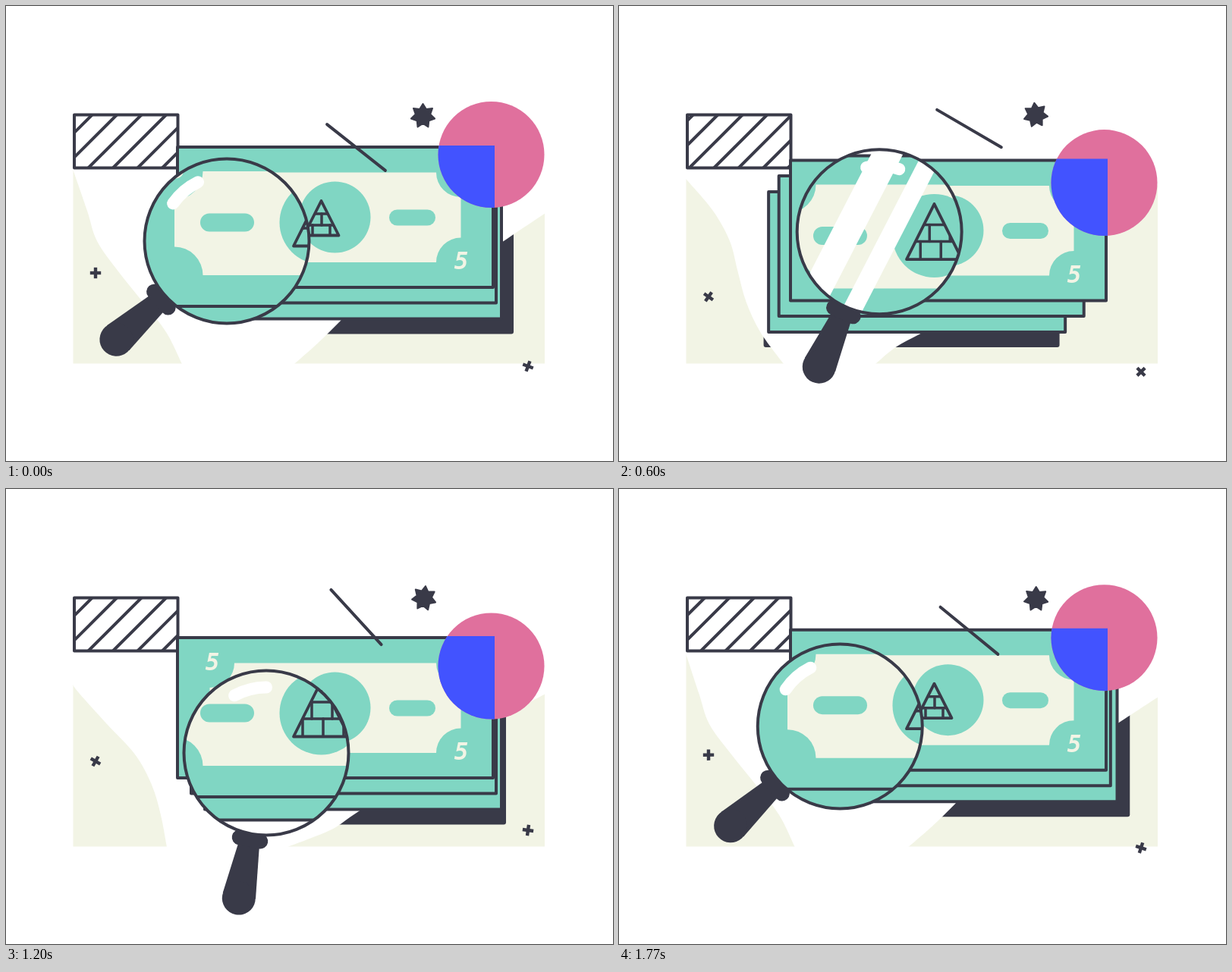
An HTML page with a canvas that plays this animation: 800 by 600 pixels, repeating every 1800 ms.

```html
<!DOCTYPE html>
<html lang="en">
<head>
<meta charset="utf-8">
<title>Banknotes under a magnifier</title>
<style>
  html, body { margin: 0; width: 100%; height: 100%; overflow: hidden; background: #fff; }
  canvas { display: block; }
</style>
</head>
<body>
<canvas id="stage" width="800" height="600"></canvas>
<script>
const c = document.getElementById('stage').getContext('2d');
const DARK = '#393a48', TEAL = '#80d6c3', CREAM = '#f2f4e5', PINK = '#e0709d', BLUE = '#4253ff', WHITE = '#fff';
const LOOP = 1800, STEP = 30, TAU = Math.PI * 2, RAD = Math.PI / 180;
const TIMES = [0, 240, 480, 750, 1200, 1530];
let now = 0;

// Smooth periodic curve through one value per entry of TIMES.
function key(...v) {
  const n = TIMES.length;
  const time = i => TIMES[(i + n) % n] + LOOP * Math.floor(i / n);
  const val = i => v[(i + n) % n];
  const slope = i => (val(i + 1) - val(i)) / (time(i + 1) - time(i));
  const tangent = i => {
    const a = time(i) - time(i - 1), b = time(i + 1) - time(i);
    return (slope(i - 1) * b + slope(i) * a) / (a + b);
  };
  let i = n - 1;
  while (TIMES[i] > now) i--;
  const h = time(i + 1) - time(i), u = (now - time(i)) / h, w = 1 - u;
  return w * w * (1 + 2 * u) * val(i) + u * w * w * h * tangent(i)
    + u * u * (3 - 2 * u) * val(i + 1) - u * u * w * h * tangent(i + 1);
}

function fill(color) { c.fillStyle = color; c.fill(); }
function stroke(width = 4, color = DARK) { c.lineWidth = width; c.strokeStyle = color; c.stroke(); }

function line(x1, y1, x2, y2, width, color) {
  c.beginPath();
  c.moveTo(x1, y1);
  c.lineTo(x2, y2);
  stroke(width, color);
}

function disc(x, y, r, color) {
  c.beginPath();
  c.arc(x, y, r, 0, TAU);
  if (color) fill(color);
}

function box(x, y, w, h, color, r = 0) {
  c.beginPath();
  c.roundRect(x, y, w, h, r);
  fill(color);
}

function placed(x, y, degrees, draw) {
  c.save();
  c.translate(x, y);
  c.rotate(degrees * RAD);
  draw();
  c.restore();
}

// Continues the path smoothly through the points.
function curve(p) {
  c.lineTo(...p[0]);
  for (let i = 0; i < p.length - 1; i++) {
    const a = p[i - 1] || p[i], b = p[i], d = p[i + 1], e = p[i + 2] || d;
    c.bezierCurveTo(b[0] + (d[0] - a[0]) / 6, b[1] + (d[1] - a[1]) / 6,
      d[0] - (e[0] - b[0]) / 6, d[1] - (e[1] - b[1]) / 6, d[0], d[1]);
  }
}

function backdrop(y) {
  box(88.5, 200, 621.5, 271.5, CREAM);
  const right = key(669, 625, 587, 583.5, 659, 695);
  box(right - 390, y + 50, 390, 196.5, DARK, 3);

  const x433 = key(423, 404, 394, 403, 453, 441), x415 = key(441, 422, 422, 445, 480, 460);
  const y650 = key(314, 312, 301, 280, 303, 312), y710 = key(273, 259, 240, 235, 270, 278);
  c.beginPath();
  c.moveTo(86, 100);
  curve([
    [88, key(215, 215, 222, 236, 258, 243)],
    [key(107, 121, 125, 120, 97, 96), 270],
    [key(120, 131, 143, 147, 133, 115), 310],
    [key(148, 147, 151, 164, 170, 150), 350],
    [key(180, 177, 166, 173, 192, 182), 390],
    [key(211, 205, 190, 185, 204, 208), 430],
    [key(232, 232, 222, 212, 212, 228), 472]
  ]);
  curve([
    [key(380, 367, 348, 330, 371, 390), 472],
    [key(405, 388, 370, 364, 427, 420), 450],
    [x433, 433],
    [x415, 415],
    [2 * x415 - x433, 397],
    [600, y650 + (y650 - y710) * .83],
    [650, y650],
    [711, y710]
  ]);
  c.lineTo(711, 100);
  fill(WHITE);
}

function hatchedBox() {
  c.save();
  c.beginPath();
  c.rect(90, 143.5, 136.5, 70);
  fill(WHITE);
  c.clip();
  const shift = key(0, 7, 14, 18, 0, -3);
  for (let i = -4; i < 5; i++) {
    const x = 110 + shift + 32.5 * i;
    line(x - 2, 214, x + 70, 142);
  }
  c.restore();
  c.beginPath();
  c.rect(90, 143.5, 136.5, 70);
  stroke();
}

function note(x, y, w, h) {
  c.beginPath();
  c.rect(x, y, w, h);
  fill(TEAL);
  stroke();
}

function panel(x0, x1, y0, y1, r) {
  const q = Math.PI / 2;
  c.beginPath();
  c.arc(x1, y0, r, 2 * q, q, true);
  c.arc(x1, y1, r, -q, -2 * q, true);
  c.arc(x0, y1, r, 0, -q, true);
  c.arc(x0, y0, r, q, 0, true);
  fill(CREAM);
}

function five(x, y, size) {
  c.font = `italic bold ${size}px "DejaVu Sans Mono", monospace`;
  c.textAlign = 'center';
  c.fillStyle = CREAM;
  c.fillText('5', x, y + size * .365);
}

function pyramid(top, base, half, rows, upper, lower) {
  const x = 415.5;
  const outline = () => {
    c.beginPath();
    c.moveTo(x, top);
    c.lineTo(x + half, base);
    c.lineTo(x - half, base);
    c.closePath();
  };
  c.save();
  outline();
  c.clip();
  for (const y of rows) line(x - half, y, x + half, y, 3.5);
  for (const u of upper) line(u, rows[0], u, rows[1], 3.5);
  for (const l of lower) line(l, rows[1], l, base, 3.5);
  c.restore();
  outline();
  stroke(3.8);
}

function frontNote(y) {
  note(226, y, 416, 185);
  panel(268.5, 599.5, y + 33.5, y + 152, 32.5);
  box(505, y + 82.5, 61, 21, TEAL, 10.5);
  disc(433.5, y + 92.5, 47, TEAL);
  pyramid(y + 71, y + 116.5, 23, [y + 88, y + 103], [416], [404, 427]);
  five(600, y + 150, 31);
  five(272, y + 32, 31);
}

function magnifiedNote(y) {
  note(150, y + 30, 480, 210.5);
  note(150, y - 6, 480, 216);
  panel(222, 607, y + 32, y + 169, 37.5);
  five(226, y + 28, 36);
  box(256, y + 87.5, 71, 24, TEAL, 12);
  disc(415.5, y + 99.5, 55, TEAL);
  const brick = key(380, 387, 394, 400, 391, 374);
  const row = x => [x, x + 27, x + 54];
  pyramid(y + 57.5, y + 130.5, 36.5, [y + 85, y + 107], row(brick + 12), row(brick));
}

function glare(x, w) {
  const lean = 120 * .516;
  c.beginPath();
  c.moveTo(x + lean, -120);
  c.lineTo(x + w + lean, -120);
  c.lineTo(x + w - lean, 120);
  c.lineTo(x - lean, 120);
  fill(WHITE);
}

function magnifier(y) {
  const x = key(291, 303, 330.5, 355, 343, 306), cy = key(310, 290, 289.5, 311.5, 348, 337.5);
  placed(x, cy, key(48.3, 42.9, 30.9, 16.3, 10.7, 33.7), () => {
    c.beginPath();
    c.moveTo(-13, 115);
    c.lineTo(13, 115);
    c.lineTo(22, 192);
    c.lineTo(-22, 192);
    fill(DARK);
    disc(0, 195, 22, DARK);
    line(-14, 116, 14, 116, 20);
  });

  c.save();
  disc(x, cy, 108.5, WHITE);
  c.clip();
  magnifiedNote(y);
  c.translate(x, cy);
  const sweep = -177 + .315 * (now - 240);
  glare(sweep, 42);
  glare(sweep + 67, 28);
  const end = key(244, 254, 280, 292, 270, 242);
  c.beginPath();
  c.arc(0, 0, 86.5, (end - 29) * RAD, end * RAD);
  stroke(16, WHITE);
  c.restore();
  disc(x, cy, 108.5);
  stroke();
}

function sun(y) {
  const cy = key(196, 205, 223.5, 242.5, 233.5, 207);
  disc(639.5, cy, 70, PINK);
  c.save();
  c.clip();
  box(224, y - 2, 420, 189, BLUE);
  c.restore();
}

function star() {
  placed(key(549.5, 549, 549, 549.5, 551, 550.5), key(145, 145, 144, 143.5, 144, 145),
    key(0, -4, -7, -4, 7, 5), () => {
      c.beginPath();
      for (let i = 0; i < 14; i++) {
        const r = i % 2 ? 10 : 16, a = i * TAU / 14;
        c.lineTo(r * Math.sin(a), -r * Math.cos(a));
      }
      c.closePath();
      fill(DARK);
      stroke(2);
    });
}

function plus(x, y, angle) {
  placed(x, y, angle, () => {
    c.lineCap = 'butt';
    line(-7.2, 0, 7.2, 0, 4.4);
    line(0, -7.2, 0, 7.2, 4.4);
  });
}

function draw() {
  now = Math.floor(performance.now() % LOOP / STEP) * STEP;
  c.fillStyle = WHITE;
  c.fillRect(0, 0, 800, 600);
  c.lineCap = c.lineJoin = 'round';

  const y = key(186, 193, 201, 205, 196, 186.5);
  backdrop(y);
  hatchedBox();
  note(key(653, 618, 591, 593, 653, 676) - 391, y + 41.5, 391, 185);
  note(key(646, 628, 614, 615.5, 646, 658) - 402, y + 20.5, 402, 185);
  frontNote(y);
  sun(y);
  magnifier(y);
  placed(461.5, key(186.5, 178.5, 166.5, 157.5, 169, 184),
    key(38.4, 31.6, 28.4, 34.2, 47.5, 47), () => line(-49, 0, 49, 0));
  star();
  plus(118, key(352, 367, 380, 384, 359, 345), key(0, 12, 27, 43, 30, 5));
  plus(688, key(475, 488, 488, 473, 450, 458), key(20, 34, 45, 42, 8, 0));
  requestAnimationFrame(draw);
}
draw();
</script>
</body>
</html>
```
